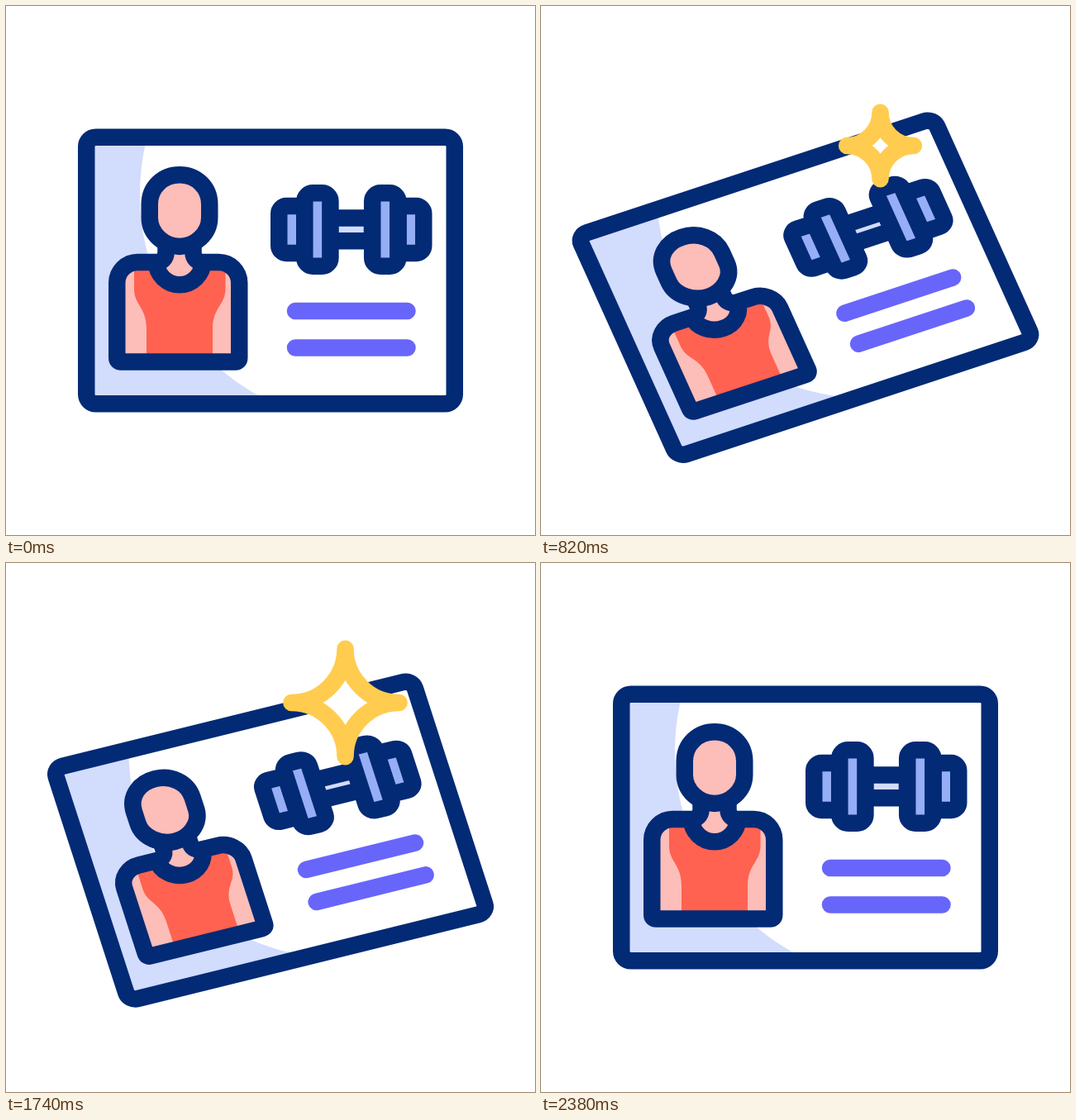
An HTML page with a canvas that plays this animation: 640 by 640 pixels, repeating every 2.4 s.

```html
<!DOCTYPE html>
<html lang="en">
<head>
<meta charset="utf-8">
<title>Gym membership card</title>
<style>
  html, body { margin: 0; width: 100%; height: 100%; overflow: hidden; background: #fff; }
  canvas { display: block; width: 100vw; height: 100vh; }
</style>
</head>
<body>
<canvas id="stage" width="640" height="640"></canvas>
<script>
const ctx = document.getElementById('stage').getContext('2d');
const LOOP = 2400;
const LINE = 20.5;
const NAVY = '#032a75', LAVENDER = '#d2dcfd', BLUE = '#95aef5', PURPLE = '#6866fa';
const SKIN = '#fdbdb8', RED = '#ff6250', YELLOW = '#ffcc50', WHITE = '#fff';

const svg = d => new Path2D(d);
const box = (x, y, w, h, r) => {
  const path = new Path2D();
  path.roundRect(x, y, w, h, r);
  return path;
};

const shapes = {
  card: box(97.25, 158.75, 445.5, 322.5, 11.5),
  body: svg('M193.5 291V298.5C193.5 305 188.5 310 182 310H159.25C145.5 310 134.25 321.2 134.25 335' +
            'V425.5Q134.25 430.5 139.25 430.5H277.25Q282.25 430.5 282.25 425.5' +
            'V335C282.25 321.2 271 310 257.25 310H238C231.5 310 226.5 305 226.5 298.5V291'),
  shirt: svg('M155 310H265.5V342C265.5 362 250 364 250 391V430H170V391C170 364 155 362 155 342Z'),
  collar: svg('M181.8 309A28.2 28.2 0 0 0 238.2 309'),
  head: svg('M173.75 240C173.75 219 190 204.25 210 204.25S246.25 219 246.25 240' +
            'V256C246.25 276 228 291 210 291S173.75 276 173.75 256Z'),
  handle: box(392, 256.6, 51, 27.6, 0),
  smallLeft: box(330.25, 242.1, 31, 56.8, 9),
  smallRight: box(474.5, 242.1, 30.75, 56.8, 9),
  bigLeft: box(361.3, 226.2, 31.1, 88.5, 10),
  bigRight: box(443.2, 226.2, 31.1, 88.5, 10),
  lines: svg('M350 369H485.5M350 413.6H485.5')
};

const smooth = s => s * s * (3 - 2 * s);

// Symmetric cubic-bezier(a, 0, 1 - a, 1)
function bezierEase(x, a) {
  let low = 0, high = 1;
  for (let i = 0; i < 30; i++) {
    const s = (low + high) / 2, r = 1 - s;
    if (3 * r * r * s * a + 3 * r * s * s * (1 - a) + s ** 3 < x) low = s;
    else high = s;
  }
  return smooth(low);
}

function tiltAt(time) {
  const x = (time - 30) / 1176;
  if (x <= 0 || x >= 2) return 0;
  return bezierEase(x < 1 ? x : 2 - x, 0.77);
}

function starSizeAt(time) {
  const x = (time - 618) / 360;
  if (x < -0.04 || x >= 4) return null;
  const phase = Math.max(x, 0) % 2;
  return 67.8 * smooth(phase < 1 ? phase : 2 - phase);
}

// Points are moved first, so the outlines keep an even width.
function paint(path, matrix, fill, stroke) {
  const placed = new Path2D();
  placed.addPath(path, matrix);
  if (fill) {
    ctx.fillStyle = fill;
    ctx.fill(placed);
  }
  if (stroke) {
    ctx.strokeStyle = stroke;
    ctx.stroke(placed);
  }
}

function shade(tilt) {
  return svg(`M107 168.5L${168.4 + 29 * tilt} 168.5` +
    `C${142.2 + 22 * tilt} 289 198.2 412 ${306 - 5 * tilt} 471.5L107 471.5Z`);
}

function drawCard(tilt) {
  const matrix = new DOMMatrix([
    1 - 0.038 * tilt, -0.357 * tilt,
    0.419 * tilt, 1 - 0.19 * tilt,
    320, 320 + 23.1 * tilt
  ]).translate(-320, -320);
  const put = (path, fill, stroke) => paint(path, matrix, fill, stroke);

  put(shapes.card, WHITE);
  put(shade(tilt), LAVENDER);
  put(shapes.card, null, NAVY);

  ctx.lineCap = 'butt';
  put(shapes.body, SKIN);
  put(shapes.shirt, RED);
  put(shapes.collar, SKIN, NAVY);
  put(shapes.body, null, NAVY);
  put(shapes.head, SKIN, NAVY);

  put(shapes.handle, LAVENDER, NAVY);
  for (const name of ['smallLeft', 'smallRight', 'bigLeft', 'bigRight'])
    put(shapes[name], BLUE, NAVY);

  ctx.lineCap = 'round';
  put(shapes.lines, null, PURPLE);
}

function drawStar(size) {
  const d = Math.max(size, 0.3), k = d * 0.4477;
  const star = svg(`M0 ${-d}C0 ${-k} ${k} 0 ${d} 0C${k} 0 0 ${k} 0 ${d}` +
    `C0 ${k} ${-k} 0 ${-d} 0C${-k} 0 0 ${-k} 0 ${-d}Z`);
  paint(star, new DOMMatrix([1, 0, 0, 1, 410.5, 169]), WHITE, YELLOW);
}

function draw(time) {
  ctx.fillStyle = WHITE;
  ctx.fillRect(0, 0, 640, 640);
  ctx.lineWidth = LINE;
  ctx.lineJoin = 'round';
  drawCard(tiltAt(time));
  const size = starSizeAt(time);
  if (size !== null) drawStar(size);
}

const start = performance.now();
function tick() {
  draw((performance.now() - start) % LOOP);
  requestAnimationFrame(tick);
}
tick();
</script>
</body>
</html>
```
